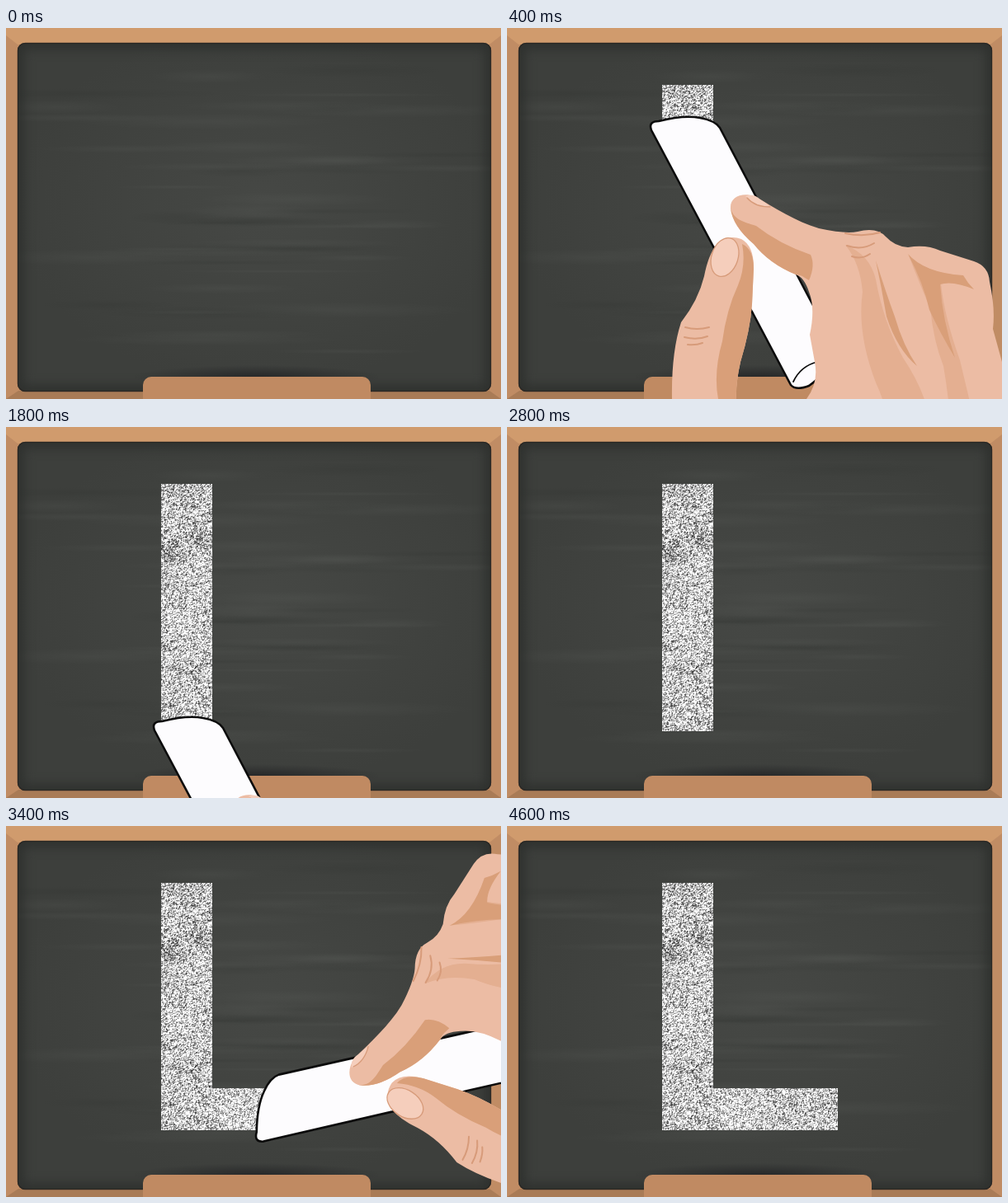
Animation of 600x450 px, one loop 4.8 s. Source, as an HTML page with a canvas:

```html
<!DOCTYPE html>
<html lang="en">
<head>
<meta charset="utf-8">
<title>Chalk letter</title>
<style>
  html, body { margin: 0; width: 100%; height: 100%; overflow: hidden; background: #c08c64; }
  canvas { display: block; width: 600px; height: 450px; }
</style>
</head>
<body>
<canvas id="stage" width="600" height="450"></canvas>
<script>
const W = 600, H = 450, LOOP = 4800, STEP = 200;
const ctx = document.getElementById('stage').getContext('2d');
const SKIN = '#ecbca4', MID = '#e4af91', SHADE = '#d99f79', LINE = '#d79b7a', NAIL = '#f5cebc';

function random(seed) {
  return () => {
    seed = (seed + 0x6D2B79F5) | 0;
    let t = Math.imul(seed ^ (seed >>> 15), 1 | seed);
    t = (t + Math.imul(t ^ (t >>> 7), 61 | t)) ^ t;
    return ((t ^ (t >>> 14)) >>> 0) / 4294967296;
  };
}

function layer(w, h, draw) {
  const c = document.createElement('canvas');
  c.width = w;
  c.height = h;
  draw(c.getContext('2d'));
  return c;
}

function fill(g, color, path) {
  g.fillStyle = color;
  g.fill(new Path2D(path));
}

function line(g, color, width, path) {
  g.strokeStyle = color;
  g.lineWidth = width;
  g.stroke(new Path2D(path));
}

function blob(g, x, y, rx, ry, rgb, alpha) {
  g.save();
  g.translate(x, y);
  g.scale(rx, ry);
  const grad = g.createRadialGradient(0, 0, 0, 0, 0, 1);
  grad.addColorStop(0, `rgba(${rgb},${alpha})`);
  grad.addColorStop(1, `rgba(${rgb},0)`);
  g.fillStyle = grad;
  g.fillRect(-1, -1, 2, 2);
  g.restore();
}

const board = layer(W, H, g => {
  fill(g, '#c08c64', 'M0 0H600V450H0Z');
  fill(g, '#d09b6d', 'M0 0H600V9L586 20H14L0 9Z');
  fill(g, '#a97b56', 'M0 450L15 440H586L600 450Z');

  g.save();
  g.beginPath();
  g.roundRect(14, 18, 574, 423, 9);
  g.fillStyle = '#3d3f3c';
  g.fill();
  g.clip();
  blob(g, 310, 215, 300, 220, '76,78,75', 0.6);
  const rnd = random(11);
  for (let i = 0; i < 46; i++) {
    const tone = i % 3 ? '98,101,97' : '42,45,42';
    blob(g, 60 + rnd() * 480, 50 + rnd() * 350, 60 + rnd() * 120, 2 + rnd() * 8, tone, 0.16);
  }
  g.filter = 'blur(7px)';
  g.strokeStyle = 'rgba(40,43,40,.75)';
  g.lineWidth = 16;
  g.strokeRect(13, 17, 576, 425);
  g.filter = 'none';
  blob(g, 304, 423, 150, 14, '34,35,37', 0.8);
  g.restore();

  g.strokeStyle = 'rgba(42,38,34,.8)';
  g.lineWidth = 1.5;
  g.beginPath();
  g.roundRect(14.5, 18.5, 573, 422, 9);
  g.stroke();

  g.fillStyle = '#c08a62';
  g.beginPath();
  g.roundRect(166, 423, 276, 40, 10);
  g.fill();
});

// Grainy chalk fill in the shape of an L, placed at (188, 69)
const LX = 188, LY = 69, LW = 213, LH = 300, STEM = 62, FOOT = 249;
const letter = layer(LW, LH, g => {
  const rnd = random(5), img = g.createImageData(LW, LH);
  const grain = Array.from({ length: LW * LH }, rnd);
  const bump = (x, y, cx, cy, r) => Math.exp(-((x - cx) ** 2 + (y - cy) ** 2) / (r * r));
  for (let y = 0; y < LH; y++) {
    for (let x = 0; x < LW; x++) {
      if (x >= STEM && y < FOOT) continue;
      const i = y * LW + x;
      const n = (grain[i] * 2 + (grain[i + 1] ?? 0.5) + (grain[i + LW] ?? 0.5)) / 4;
      const patch = 28 * bump(x, y, 98, 282, 26) + 22 * bump(x, y, 28, 175, 30)
        - 48 * bump(x, y, 48, 64, 13) - 40 * bump(x, y, 8, 82, 16)
        - 24 * bump(x, y, 4, 190, 18) - 16 * bump(x, y, 30, 5, 28);
      const v = 196 + patch + (n - 0.5) * 330;
      img.data.set([v, v, v, 255], i * 4);
    }
  }
  g.putImageData(img, 0, 0);
});

function drawHand(g) {
  g.lineCap = g.lineJoin = 'round';

  const chalk = 'M175 124C172 116 176 113 184 113C200 109 218 106 234 109Q252 112 258 121' +
    'L366 327L405 400Q380 424 366 434Q350 440 344 433L298 346L250 265Z';
  fill(g, '#fdfcfe', chalk);
  line(g, '#0b0b0b', 2.6, chalk);
  line(g, '#0b0b0b', 1.8, 'M347 429Q356 410 376 405');

  fill(g, SKIN, 'M271 219C270 205 284 199 300 204C325 218 350 235 378 243Q410 250 425 247' +
    'Q448 241 459 253Q470 265 486 266Q508 262 525 270L566 283Q584 289 585 308' +
    'Q592 340 589 365L600 405L612 640H360L363 450Q378 430 373 405L367 372' +
    'Q374 340 366 320Q360 302 350 299Q318 286 299 262Q274 241 271 219Z');
  fill(g, SHADE, 'M271 218C274 232 286 235 302 240Q330 262 368 275Q374 288 366 306' +
    'L361 303Q358 300 350 299Q318 286 299 262Q273 240 271 218Z');
  fill(g, MID, 'M410 263Q440 275 447 305Q456 356 480 400Q503 434 512 470L520 640H470' +
    'Q480 500 447 430Q424 370 431 320Q428 285 410 263Z');
  fill(g, MID, 'M487 276Q505 296 526 310Q530 350 549 403L565 470L566 640H540' +
    'Q545 500 529 410Q517 380 513 340Q498 305 487 276Z');
  fill(g, SHADE, 'M486 274Q506 297 553 300Q558 309 566 317Q540 306 525 311' +
    'Q528 355 543 400Q525 370 512 342Q505 310 486 274Z');
  fill(g, SHADE, 'M447 282Q459 320 470 350Q480 385 497 410Q473 390 460 350Q454 315 447 282Z');
  line(g, LINE, 2, 'M410 249Q432 254 452 248M412 264Q430 270 445 261M418 277Q430 281 440 274');
  fill(g, NAIL, 'M289 204Q299 200 307 208Q314 212 320 218Q302 217 289 204Z');
  line(g, LINE, 1.3, 'M291 206Q300 217 319 217');

  fill(g, SKIN, 'M196 640L200 450Q199 394 211 357Q232 330 239 301Q244 275 254 263' +
    'Q267 250 284 256Q299 264 299 290L297 335Q295 365 283 405Q277 432 278 450L292 640Z');
  fill(g, SHADE, 'M285 262Q299 268 299 292L297 335Q295 365 283 405Q277 432 278 450L292 640' +
    'H258L256 450Q250 418 261 380Q266 342 280 312Q290 288 285 262Z');
  line(g, LINE, 2, 'M216 363Q230 367 245 363M215 375Q230 379 243 374M219 384Q229 385 237 382');
  g.save();
  g.translate(264, 278);
  g.rotate(0.32);
  g.beginPath();
  g.ellipse(0, 0, 16, 24, 0, 0, Math.PI * 2);
  g.fillStyle = NAIL;
  g.fill();
  g.strokeStyle = LINE;
  g.lineWidth = 1.3;
  g.stroke();
  g.restore();
}

// Chalk tip per step: downstroke from step 1, cross stroke from step 15
const down = [[172, 31], [174, 118], [176, 204], [178, 290],
  [179, 362], [179, 362], [179, 362], [179, 362], [179, 362]];
const across = [229, 262, 306, 361, 398, 404];
const TURN = -75 * Math.PI / 180;

function placeHand(x, y, angle) {
  ctx.save();
  ctx.translate(x, y);
  ctx.rotate(angle);
  ctx.translate(-174, -118);
  drawHand(ctx);
  ctx.restore();
}

function showLetter(right, bottom) {
  ctx.save();
  ctx.beginPath();
  ctx.rect(0, 0, right, bottom);
  ctx.clip();
  ctx.drawImage(letter, LX, LY);
  ctx.restore();
}

function render(step) {
  ctx.drawImage(board, 0, 0);
  const tip = down[step - 1], x = across[step - 15];
  if (step < 10) {
    if (!tip) return;
    showLetter(LX + STEM, tip[1] + 2);
    placeHand(tip[0], tip[1], 0);
  } else if (step < 15) {
    showLetter(LX + STEM, H);
  } else if (x) {
    showLetter(Math.max(LX + STEM, x + 15), H);
    placeHand(x, 382, TURN);
  } else {
    showLetter(W, H);
  }
}

const start = performance.now();
let shown = -1;
function tick() {
  const step = Math.floor(((performance.now() - start) % LOOP) / STEP);
  if (step !== shown) render(shown = step);
  requestAnimationFrame(tick);
}
tick();
</script>
</body>
</html>
```
